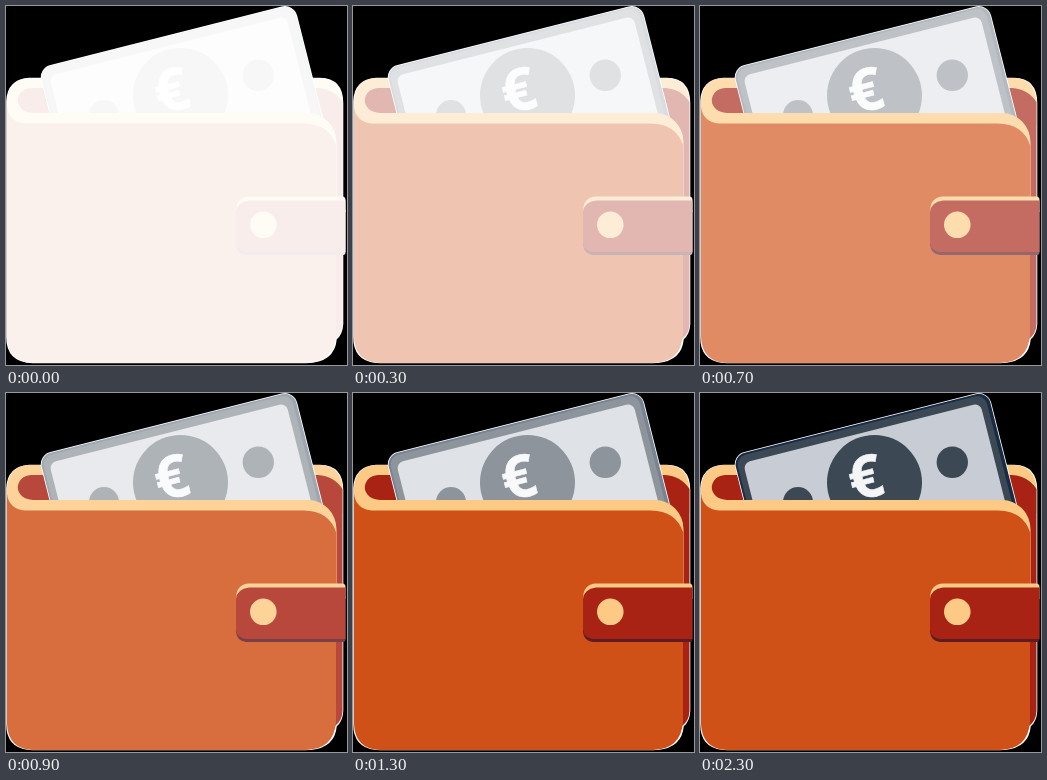
These frames come from a looping animation (341x359 px, 2.5 s). An HTML page:

```html
<!DOCTYPE html>
<html lang="en">
<head>
<meta charset="utf-8">
<title>Wallet</title>
<style>
  html, body { margin: 0; width: 100%; height: 100%; overflow: hidden; background: #000; }
  svg { display: block; width: 341px; height: 359px; }
  text { font: 700 59px "Open Sans", "Noto Sans", sans-serif; text-anchor: middle; }
  .fringe { fill: #fff; stroke: #fff; stroke-width: 1.6px; }
  .leather { fill: var(--leather); }
  .inside { fill: var(--inside); }
  .trim { fill: var(--trim); }
  .shade { fill: var(--shade); }
  .edge { fill: var(--edge); }
  .paper { fill: var(--paper); }
  .ink { fill: var(--ink); }
  .sign { fill: var(--sign); stroke: var(--sign); stroke-width: .6px; }
</style>
</head>
<body>
<svg viewBox="0 0 341 359">
  <!-- light fringe around the wallet -->
  <path class="fringe" d="M23 72.500H314Q336.500 73 336.500 97V318Q336 328 330 333Q328 356 300 356.500H27Q1 356 1 331V95Q2 74 23 72.500Z"/>

  <!-- back of the wallet -->
  <path class="trim" d="M22 72H314Q336 73 336.500 97V120H1V95Q2 74 22 72Z"/>
  <path class="inside" d="M25 82H312Q328 83 336.500 96V318Q336 328 329 333H300V120H30Q12 112 11.500 95Q13 83 25 82Z"/>

  <!-- banknote -->
  <g transform="translate(33 62.700) rotate(-14.200)">
    <rect class="fringe" width="262.500" height="130" rx="12"/>
    <rect class="edge" width="262.500" height="130" rx="12"/>
    <rect class="ink" x="2" y="2" width="257" height="128" rx="10"/>
    <rect class="paper" x="8" y="9.500" width="244.500" height="120" rx="7"/>
  </g>
  <g class="ink">
    <circle cx="174.500" cy="89.500" r="47.500"/>
    <circle cx="252.300" cy="69.300" r="15.700"/>
    <circle cx="98" cy="109" r="15"/>
  </g>
  <text class="sign" transform="translate(165 83.500) rotate(-14.200)" y="21.500">€</text>

  <!-- front of the wallet -->
  <path class="trim" d="M1 94H11.500Q13 106 27 107H302A28.500 29 0 0 1 330.500 136V200H1Z"/>
  <path class="leather" d="M1 101Q3 116 19 117.500H298Q323 118 330 139V329Q328 356 300 357H27Q2 356 1 331Z"/>

  <!-- strap -->
  <path class="shade" d="M230 204H339.500V246Q339.500 249 337 249H240Q231 248 230 239Z"/>
  <path class="trim" d="M230 206Q230 191 243 190.500H337Q339.500 191 339.500 194V206H230Z"/>
  <path class="inside" d="M230 206Q231 196 243 194.500H339.500V246H240Q231 245 230 237Z"/>
  <circle class="trim" cx="257.300" cy="218.800" r="13.300"/>
</svg>
<script>
  const wallet = {
    leather: [208, 81, 23], inside: [168, 35, 20],
    trim: [252, 202, 133], shade: [94, 27, 34]
  };
  const note = {
    edge: [24, 44, 70], paper: [200, 205, 213],
    ink: [60, 72, 84], sign: [243, 245, 247]
  };
  const root = document.documentElement.style;

  // Tint each colour from white towards its full strength.
  function tint(colors, amount) {
    for (const [name, rgb] of Object.entries(colors)) {
      const mixed = rgb.map(c => Math.round(255 + (c - 255) * amount));
      root.setProperty("--" + name, `rgb(${mixed})`);
    }
  }

  const start = performance.now();
  function draw(now) {
    const time = Math.max(0, now - start) % 2500;
    const step = Math.min(24, Math.floor(time / 100) + 1);
    tint(wallet, Math.min(1, step / 12));
    tint(note, step / 24);
    requestAnimationFrame(draw);
  }
  draw(start);
</script>
</body>
</html>
```
